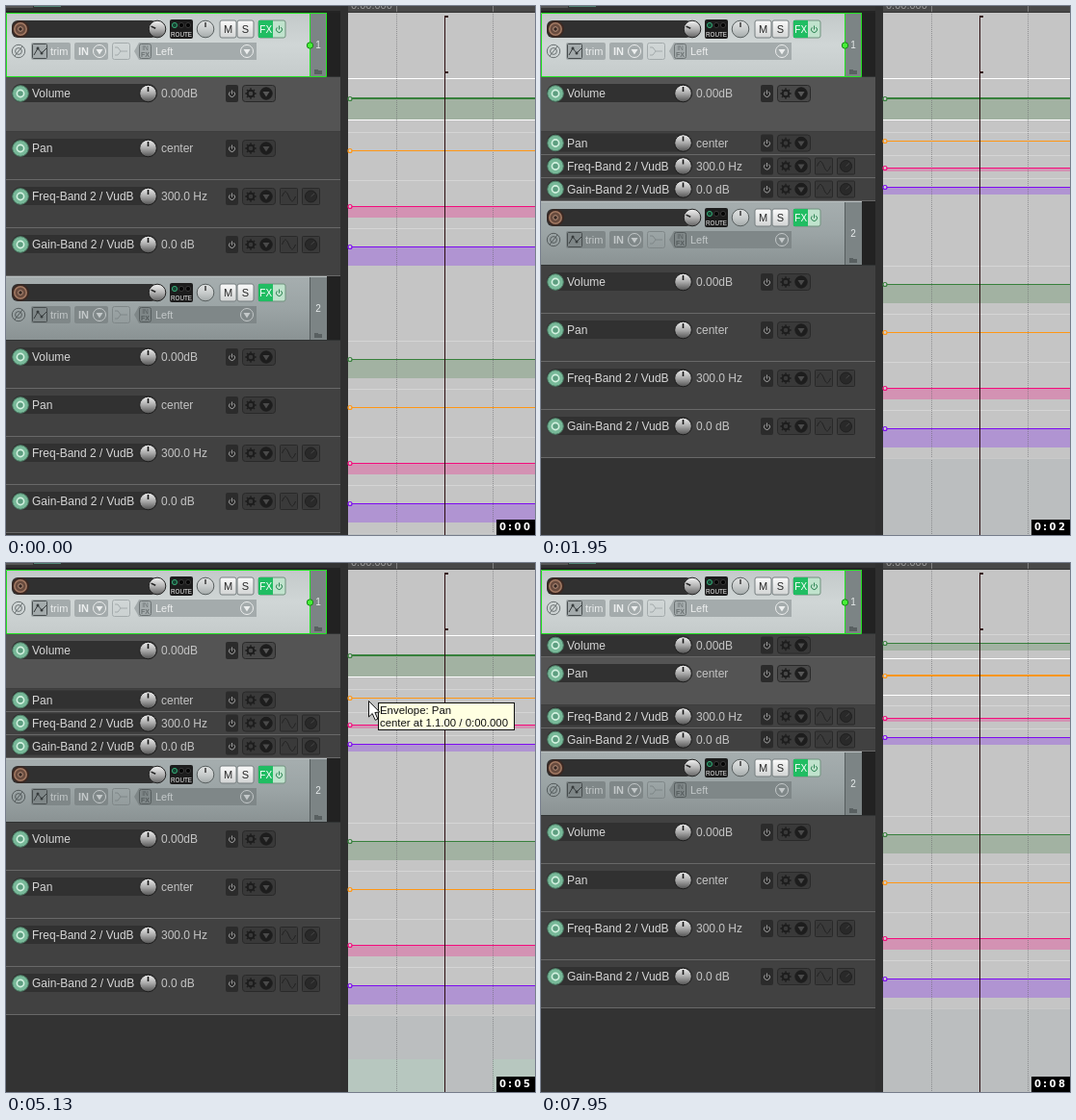
Animation of 549x550 px, one loop 8000 ms. Source, as an HTML page with a canvas:

```html
<!DOCTYPE html>
<html lang="en">
<head>
<meta charset="utf-8">
<title>Envelope lanes</title>
<style>
html, body { margin: 0; width: 100%; height: 100%; overflow: hidden; background: #333; }
canvas { display: block; width: 549px; height: 550px; }
</style>
</head>
<body>
<canvas id="stage" width="549" height="550"></canvas>
<script>
const g = document.getElementById('stage').getContext('2d');
const LOOP = 8000, PANEL = 347, LANE = 355, W = 549, H = 550, TRACK_H = 67;
const SANS = '"Liberation Sans", Arial, sans-serif';

const ENVELOPES = [
  { name: 'Volume', value: '0.00dB', line: '#37803c', fill: '#a2b2a2' },
  { name: 'Pan', value: 'center', line: '#ff9614' },
  { name: 'Freq-Band 2 / VudB', value: '300.0 Hz', line: '#f40c7c', fill: '#d392b3', extra: true },
  { name: 'Gain-Band 2 / VudB', value: '0.0 dB', line: '#7d0bf0', fill: '#b094d2', extra: true }
];

// Per row height: centre of the lane, its lower edge, and the frequency level.
const SHAPE = { 57: [22, 44, 31], 50: [19, 39, 27], 24: [9, 17, 13] };

// [start, row heights of the first track]
const LAYOUTS = [
  [0, [57, 50, 50, 50]],
  [1140, [24, 50, 50, 50]],
  [1950, [57, 24, 24, 24]],
  [3090, [24, 50, 50, 50]],
  [4050, [57, 24, 24, 24]],
  [7550, [24, 50, 24, 24]]
];
const TICKS = [990, 1950, 2940, 3930, 4980, 5990, 7020, 7950];

// [time, x, y] of the pointer tip; it leaves at the last entry.
const POINTER = [
  [4730, 497, 155], [4880, 418, 151], [5130, 376, 143], [5250, 321, 140],
  [5400, 320, 144], [5990, 320, 146], [6140, 327, 162], [6290, 329, 164],
  [6440, 331, 164], [6590, -50, -50]
];
const SELECT_PAN = 5520, RING_END = 5640;

const latest = (list, t) => list.filter(e => t >= e[0]).pop();

function rect(x, y, w, h, color) {
  g.fillStyle = color;
  g.fillRect(x, y, w, h);
}
function round(x, y, w, h, r, color, edge) {
  g.beginPath();
  g.roundRect(x, y, w, h, r);
  if (color) { g.fillStyle = color; g.fill(); }
  if (edge) { g.strokeStyle = edge; g.lineWidth = 1; g.stroke(); }
}
function disc(x, y, r, color, edge, width = 1) {
  g.beginPath();
  g.arc(x, y, r, 0, Math.PI * 2);
  if (color) { g.fillStyle = color; g.fill(); }
  if (edge) { g.strokeStyle = edge; g.lineWidth = width; g.stroke(); }
}
function path(points, color, width = 1) {
  g.beginPath();
  points.forEach(([x, y]) => g.lineTo(x, y));
  g.strokeStyle = color;
  g.lineWidth = width;
  g.stroke();
}
function text(s, x, y, size, color, align = 'left', weight = '') {
  g.font = `${weight} ${size}px ${SANS}`;
  g.textAlign = align;
  g.fillStyle = color;
  g.fillText(s, x, y);
}
function vertical(y, h, stops) {
  const grad = g.createLinearGradient(0, y, 0, y + h);
  stops.forEach((c, i) => grad.addColorStop(i / (stops.length - 1), c));
  return grad;
}
function power(x, y, color) {
  g.beginPath();
  g.arc(x, y, 3, -0.9, Math.PI + 0.9);
  g.strokeStyle = color;
  g.lineWidth = 1;
  g.stroke();
  path([[x, y - 4], [x, y]], color);
}
function dropdown(x, y, r, edge, fill, mark = edge) {
  disc(x, y, r, fill, edge);
  g.beginPath();
  g.moveTo(x - 3.5, y - 2);
  g.lineTo(x + 3.5, y - 2);
  g.lineTo(x, y + 3.5);
  g.fillStyle = mark;
  g.fill();
}
function knob(x, y, stops, edge, angle, mark) {
  disc(x, y, 8.8, vertical(y - 9, 18, stops), edge);
  path([[x + Math.sin(angle) * 2, y - Math.cos(angle) * 2],
    [x + Math.sin(angle) * 7, y - Math.cos(angle) * 7]], mark, 1.6);
}

function drawTrack(y, index) {
  const first = index === 0;
  const c = y + 17, d = y + 40;
  const box = first ? '#a4abac' : '#7f8788';
  const ink = first ? '#eceeee' : '#c3c8c9';
  const dim = first ? '#6b7273' : '#555c5d';
  rect(0, y, 333, TRACK_H, vertical(y, TRACK_H,
    first ? ['#c3c9c9', '#d0d6d6', '#c5cbcb'] : ['#a6aeaf', '#9ba4a5', '#8a9293']));
  rect(316, y, 17, TRACK_H, '#7c8485');
  rect(315, y, 1, TRACK_H, '#555c5d');
  rect(333, y, 14, TRACK_H, '#222');
  rect(0, y + TRACK_H - 1, PANEL, 1, '#303333');
  if (first) {
    round(0.5, y + 0.5, 332, TRACK_H - 1, 0, null, '#22e322');
    rect(315, y, 1, TRACK_H, '#22e322');
  } else {
    rect(0, y, 333, 1, '#b9c0c1');
  }

  round(6, c - 9, 151, 18, 6, '#303030');
  disc(15, c, 9, '#3b2923');
  disc(15, c, 6.2, '#684b3e', '#a17862', 1.6);
  disc(15, c, 2.3, '#352722', '#bd9680');
  knob(157, c, ['#f5f5f5', '#b4b4b4', '#626262'], '#242424', -1.15, '#222');

  round(170, c - 10, 24, 20, 2, '#1c1c1c');
  [175, 182, 189].forEach((x, i) => disc(x, c - 4, 2.6, i ? '#050505' : '#184333', i ? '#383838' : '#35a875'));
  text('ROUTE', 182, c + 8, 6.3, '#f0f0f0', 'center');
  knob(207, c, ['#e2e4e4', '#c9cdcd', '#a3a9a9'], '#596060', 0, '#444');

  for (const [s, x] of [['M', 222], ['S', 240]]) {
    round(x, c - 9, 17, 18, 2, vertical(c - 9, 18, ['#fafafa', '#d2d4d4']), '#777f80');
    text(s, x + 8.5, c + 4, 11, '#272727', 'center');
  }
  round(262, c - 9, 28, 18, 2, '#c0e3cd', '#71917e');
  rect(262, c - 9, 15, 18, '#20bd62');
  text('FX', 269.7, c + 4, 10, '#fff', 'center');
  power(283.5, c + 0.5, '#28814f');

  disc(13, d, 6.7, null, dim);
  disc(13, d, 3.4, null, dim);
  path([[9, d + 5], [17, d - 5]], dim);

  round(26, d - 9, 41, 18, 2, box);
  round(27.5, d - 7.5, 15, 15, 1, null, '#474d4e');
  path([[29, d + 4], [33, d - 3], [37, d + 2], [42, d - 3]], '#363b3c');
  [[33, d - 3], [37, d + 2]].forEach(([x, v]) => disc(x, v, 1.5, '#363b3c'));
  text('trim', 46, d + 4, 11, ink);

  round(71, d - 9, 35, 18, 2, box);
  text('IN', 75, d + 4, 11, ink, 'left', 'bold');
  dropdown(97, d, 6.5, ink);

  round(110.5, d - 8.5, 18, 17, 2, null, box);
  path([[113, d - 4], [116, d - 4], [119, d], [126, d]], box);
  path([[113, d + 4], [116, d + 4], [119, d]], box);

  g.beginPath();
  [[138, -9], [260, -9], [260, 9], [138, 9], [133, 0]].forEach(([x, v]) => g.lineTo(x, d + v));
  g.fillStyle = box;
  g.fill();
  round(138.5, d - 7.5, 12, 15, 2, null, dim);
  text('IN', 144.5, d - 1, 6.5, dim, 'center');
  text('FX', 144.5, d + 6, 7, dim, 'center', 'bold');
  text('Left', 155, d + 4, 11, ink);
  dropdown(250, d, 6.5, ink);

  if (first) disc(315.5, y + 34, 3.2, '#47ef36', '#168619');
  text(index + 1, 324, y + 37, 10, '#e5eaea', 'center');
  rect(320, y + 59, 4, 1, '#596061');
  rect(320, y + 60, 8, 4, '#596061');
}

function drawRow(env, y, h, selected) {
  const c = y + Math.min(17, h / 2 - 1) + (h === 24 ? 0.5 : 0);
  const plate = selected ? '#484848' : '#393939';
  const icon = '#1d1d1d', mark = selected ? '#585858' : '#4a4a4a';
  rect(0, y, PANEL, h, selected ? '#545454' : '#414141');
  rect(0, y + h - 1, PANEL, 1, selected ? '#3d3d3d' : '#686868');
  round(6, c - 10, 151, 19, 9, '#313131');
  disc(15, c, 8.3, '#78b999', '#4e8068');
  disc(15, c, 3.6, '#5d9e80', '#d4f2e1', 1.6);
  text(env.name, 27, c + 4, 12, '#d6d6d6');
  knob(147.5, c, ['#f3f3f3', '#a9a9a9', '#505050'], '#1d1d1d', 0, '#161616');
  text(env.value, 161, c + 4, 12, '#c4c4c4');

  round(228, c - 9, 13, 18, 2, '#2b2b2b');
  power(234.5, c + 0.5, '#a0a0a0');
  round(245.5, c - 8.5, 34, 17, 3, plate, '#292929');
  disc(254, c, 3.3, null, icon, 2);
  for (let i = 0; i < 8; i++) {
    const a = i * Math.PI / 4, x = Math.cos(a), v = Math.sin(a);
    path([[254 + x * 4, c + v * 4], [254 + x * 5.7, c + v * 5.7]], icon, 1.4);
  }
  dropdown(270, c, 6.2, icon, icon, mark);
  if (!env.extra) return;
  round(284.5, c - 8.5, 18, 17, 1, '#3a3a3a', '#292929');
  const wave = [];
  for (let x = -7; x <= 7; x++) wave.push([293.5 + x, c - Math.sin((x + 7) * Math.PI / 7) * 5]);
  path(wave, '#222');
  round(307.5, c - 8.5, 18, 17, 1, '#3a3a3a', '#292929');
  disc(316.5, c, 6, '#292929', '#202020');
  path([[316.5, c], [320, c - 3]], '#474747');
}

function drawLane(env, y, h, selected) {
  const [mid, low, freq] = SHAPE[h];
  const level = y + (env === ENVELOPES[2] ? freq : mid);
  const edge = selected ? '#fff' : '#d5d5d5';
  rect(LANE, y + (selected ? 1 : 0), W - LANE, 1, edge);
  if (env.fill) rect(LANE, level, W - LANE, y + low - level, env.fill);
  if (selected) rect(LANE, y + low, W - LANE, 1, edge);
  grid(y, h);
  rect(LANE, level - (selected ? 1 : 0), W - LANE, selected ? 2 : 1, env.line);
  disc(357, level + 0.5, 2, '#d0d0d0', env.line, 1.2);
}

function grid(y, h) {
  for (const x of [405, 505]) {
    for (let v = y + y % 2; v < y + h; v += 2) rect(x, v, 1, 1, 'rgba(100,100,105,.55)');
  }
}

function drawLayout(t) {
  const heights = latest(LAYOUTS, t)[1];
  const picked = t < SELECT_PAN ? 0 : 1;
  const end = 7 + TRACK_H * 2 + heights.reduce((a, b) => a + b) + 200;

  rect(0, 0, W, H, '#333');
  rect(PANEL, 0, 8, H, '#303030');
  rect(0, 0, 28, 2, '#555');
  rect(29, 0, 28, 1, '#538374');
  rect(0, 5, PANEL, 2, '#242424');
  rect(LANE, 0, W - LANE, 7, '#484848');
  text('0:00.000', 358, 3, 11, '#9a9a9a');
  for (const x of [405, 505]) rect(x, 0, 1, 6, '#808080');
  rect(LANE, 6, W - LANE, 1, '#333');
  rect(LANE, 7, W - LANE, H - 7, '#c5c5c5');

  let y = 7;
  for (let track = 0; track < 2; track++) {
    drawTrack(y, track);
    grid(y, TRACK_H);
    y += TRACK_H;
    ENVELOPES.forEach((env, i) => {
      const h = track ? 50 : heights[i];
      const selected = track === 0 && i === picked;
      drawRow(env, y, h, selected);
      drawLane(env, y, h, selected);
      y += h;
    });
  }
  rect(LANE, end, W - LANE, H - end, '#bbbebf');
  if (t >= 3090 && t < 7550) {
    const top = Math.max(end, 516);
    rect(LANE, top, 100, H - top, '#b7c7bf');
    rect(505, top, W - 505, H - top, '#b7c7bf');
  }
  grid(end, H - end);
  rect(LANE, end, W - LANE, 1, '#c9c9c9');

  rect(455, 10, 1, H - 10, '#2b0d10');
  rect(455, 10, 4, 2, '#351414');
  rect(455, 68, 4, 2, '#351414');
}

function drawTooltip() {
  rect(386, 145, 142, 29, '#111');
  rect(387, 146, 140, 27, '#ffffe1');
  text('Envelope: Pan', 388, 157, 11.4, '#111');
  text('center at 1.1.00 / 0:00.000', 388, 170, 11.4, '#111');
}

function drawPointer(t) {
  const spot = latest(POINTER, t);
  if (!spot) return;
  const [, x, y] = spot;
  if (t >= SELECT_PAN && t < RING_END) {
    disc(321.5, 145.5, 9, null, '#222', 2.4);
    disc(321.5, 145.5, 9, null, '#f4f4f4', 1.2);
  }
  g.beginPath();
  [[0.5, 0.5], [0.5, 17], [4.2, 13.5], [7.2, 20.3], [9.8, 19.2], [6.9, 12.5], [11.7, 12]]
    .forEach(([a, b]) => g.lineTo(x + a, y + b));
  g.closePath();
  g.fillStyle = '#fff';
  g.fill();
  g.strokeStyle = '#111';
  g.lineWidth = 1;
  g.stroke();
}

function drawClock(t) {
  const seconds = TICKS.filter(v => t >= v).length;
  rect(509, 534, 40, 16, '#000');
  g.font = 'bold 10px "DejaVu Sans", sans-serif';
  g.textAlign = 'left';
  g.fillStyle = '#fff';
  [['0', 512], [':', 521], ['0', 527.5], [seconds, 537]].forEach(([s, x]) => g.fillText(s, x, 545));
}

function frame(now) {
  const t = now % LOOP;
  drawLayout(t);
  if (t >= 5130 && t < RING_END) drawTooltip();
  drawPointer(t);
  drawClock(t);
}

const began = performance.now();
function loop() {
  frame(performance.now() - began);
  requestAnimationFrame(loop);
}
loop();
</script>
</body>
</html>
```
